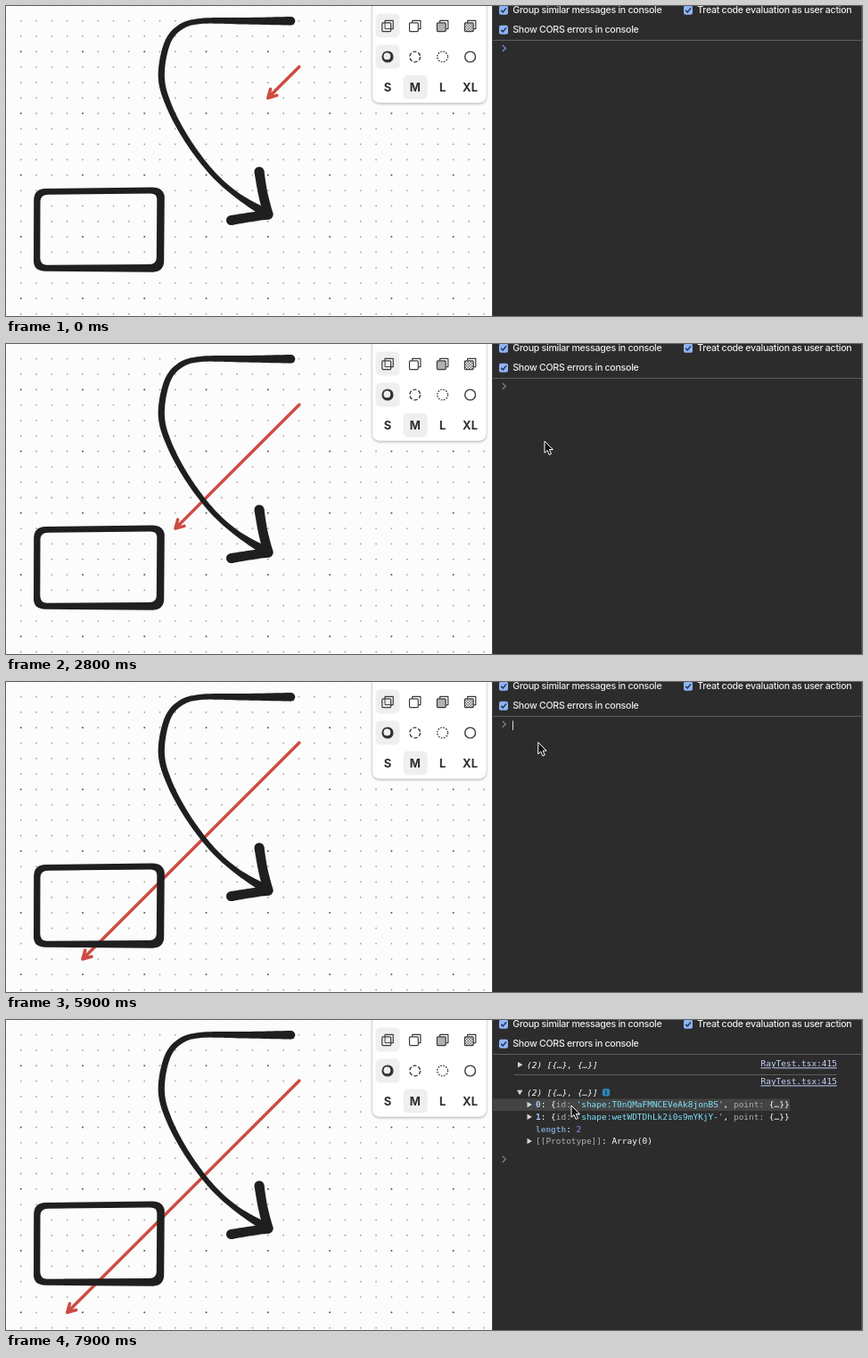
Write an HTML page that moves like this. It is 960 by 348 pixels and loops after 8 s.

```html
<!DOCTYPE html>
<html lang="en">
<head>
<meta charset="utf-8">
<title>Ray test</title>
<style>
html, body { margin: 0; width: 100%; height: 100%; overflow: hidden; background: #2c2c2c; }
svg { display: block; }
.ui { font: 500 10.65px Inter, "Open Sans", sans-serif; letter-spacing: -.028em; fill: #ececec; }
.size { font: 700 13px Inter, sans-serif; fill: #2e2e2e; text-anchor: middle; }
.log { font: 9.46px "DejaVu Sans Mono", "Liberation Mono", monospace; fill: #fff; }
.log .it { font-style: italic; }
.log .link { fill: #c6d4ff; text-decoration: underline; }
.log .key { font-weight: 700; fill: #a9cdf8; }
.log .dim { font-weight: 700; fill: #7595bd; }
.log .sub { fill: #adadad; }
.log .str { fill: #7fe2fd; }
.log .num { fill: #a08cff; }
.tri { fill: #d6d6d6; }
.line { stroke: #5e5e5e; }
.icon { fill: none; stroke: #3a3a3a; stroke-width: 1.2; stroke-linejoin: round; }
</style>
</head>
<body>
<svg width="960" height="348" viewBox="0 0 960 348">
  <defs>
    <filter id="shadow" x="-10%" y="-10%" width="120%" height="125%">
      <feDropShadow dx="0" dy="1" stdDeviation="1.6" flood-opacity=".38"/>
    </filter>
    <pattern id="hatch" width="3" height="3" patternUnits="userSpaceOnUse">
      <path d="M0 0h1.5v1.5h-1.5zM1.5 1.5h1.5v1.5h-1.5z" fill="#666"/>
    </pattern>
    <clipPath id="board"><rect width="545" height="348"/></clipPath>
  </defs>

  <g clip-path="url(#board)">
    <rect width="545" height="348" fill="#fcfcfc"/>
    <g id="dots"></g>
    <path id="ray" fill="none" stroke="#cd4b42" stroke-width="3.5" stroke-linecap="round" stroke-linejoin="round"/>
    <g id="ink" fill="#1f1f1f">
      <path fill-rule="evenodd" d="M44 205L164 203.4Q176.5 203.5 177.8 214L177.2 287Q176.5 298 165 298.7L44 297.8Q31.3 297 31 287L31.2 217Q32 205.4 44 205Z
        M47 211.7L162 210.4Q169.4 210.4 169.3 217L168.8 283Q168.3 289.8 161 290L46 290.7Q38.6 290.7 38.3 283L38.5 219Q38.8 212 47 211.7Z"/>
    </g>
    <g>
      <rect x="411" y="-20" width="127.5" height="128.5" rx="8" fill="#fff" filter="url(#shadow)"/>
      <g fill="#efefef">
        <rect x="414.5" y="8.5" width="27" height="27" rx="5"/>
        <rect x="414.5" y="43.5" width="27" height="27" rx="5"/>
        <rect x="445.5" y="77.5" width="27" height="27" rx="5"/>
      </g>
      <g id="fills" class="icon"></g>
      <g id="dashes" class="icon"></g>
      <g id="sizes" class="size"></g>
    </g>
  </g>

  <rect x="545" width="415" height="348" fill="#2c2c2c"/>
  <path d="M545.5 0V348M959.5 0V348" stroke="#4a4a4a"/>
  <path class="line" d="M546 38.5H960"/>
  <g id="checks"></g>

  <g id="logs" class="log">
    <path class="line" d="M570 61.5H932"/>
    <path class="tri" d="M574 47.1L579.4 50.3L574 53.5Z"/>
    <text class="it" x="584" y="53.8">(2) [{…}, {…}]</text>
    <text class="link" x="846.5" y="52.4">RayTest.tsx:415</text>
    <text class="link" x="846.5" y="72.4">RayTest.tsx:415</text>
    <g id="entry">
      <path id="tri" class="tri" d="M574 77.8L579.4 81L574 84.2Z"/>
      <text class="it" x="584" y="84.6">(2) [{…}, {…}]</text>
    </g>
    <g id="tree">
      <rect id="hover" x="546" y="88.5" width="333" height="13.5" fill="#444"/>
      <rect x="668.8" y="77" width="8.4" height="8.4" rx="2.5" fill="#2e86b8"/>
      <path d="M673 78.5v1.2M673 80.6v3.2" stroke="#12283a" stroke-width="1.2"/>
      <path class="tri" d="M584.5 91.8L589.9 95L584.5 98.2ZM584.5 105.5L589.9 108.7L584.5 111.9ZM584.5 132.8L589.9 136L584.5 139.2Z"/>
      <text x="594" y="98.4"><tspan class="key">0</tspan>: {<tspan class="sub">id: </tspan><tspan class="str">'shape:T0nQMaFMNCEVeAk8jonBS'</tspan>, <tspan class="sub">point: </tspan>{…}}</text>
      <text x="594" y="112.1"><tspan class="key">1</tspan>: {<tspan class="sub">id: </tspan><tspan class="str">'shape:wetWDTDhLk2i0s9mYKjY-'</tspan>, <tspan class="sub">point: </tspan>{…}}</text>
      <text x="594" y="125.8"><tspan class="dim">length</tspan>: <tspan class="num">2</tspan></text>
      <text x="594" y="139.4"><tspan class="sub">[[Prototype]]</tspan>: Array(0)</text>
    </g>
  </g>

  <path id="prompt" fill="none" stroke-width="1.2" d="M556.8 -3.4L560.4 0L556.8 3.4"/>
  <rect id="caret" x="568" y="43.5" width="1" height="10.5" fill="#d8d8d8"/>
  <path id="mouse" d="M0 0V13.2L3 10.4L5.2 15.4L7.5 14.4L5.4 9.5H9.4Z" fill="#111" stroke="#fff" stroke-linejoin="round"/>
</svg>

<script>
const LOOP = 8000, CELL = 17.32;
const $ = id => document.getElementById(id);

function add(parent, tag, attrs, text) {
  const el = document.createElementNS("http://www.w3.org/2000/svg", tag);
  for (const k in attrs) el.setAttribute(k, attrs[k]);
  if (text) el.textContent = text;
  return parent.appendChild(el);
}

// Dot grid, every fourth dot darker
for (let i = -1; i < 32; i++) {
  for (let j = -1; j < 20; j++) {
    const major = i % 4 === 0 && j % 4 === 2;
    add($("dots"), "circle", {
      cx: 16.7 + i * CELL, cy: 16.6 + j * CELL,
      r: major ? 1 : .9, fill: major ? "#585858" : "#a2a2a2"
    });
  }
}

// Smooth stroke of changing width through [x, y, radius] points
function brush(pts) {
  const at = i => pts[Math.max(0, Math.min(pts.length - 1, i))];
  const spline = (a, b, c, d, u) =>
    b + .5 * u * (c - a + u * (2 * a - 5 * b + 4 * c - d + u * (3 * (b - c) + d - a)));
  const mid = [];
  for (let i = 0; i < pts.length - 1; i++) {
    for (let s = 0; s < 12; s++) {
      mid.push([0, 1, 2].map(k => spline(at(i - 1)[k], at(i)[k], at(i + 1)[k], at(i + 2)[k], s / 12)));
    }
  }
  mid.push(at(pts.length));
  const left = [], right = [];
  mid.forEach(([x, y, r], i) => {
    const p = mid[Math.max(0, i - 1)], q = mid[Math.min(mid.length - 1, i + 1)];
    const a = Math.atan2(q[1] - p[1], q[0] - p[0]);
    const dx = -Math.sin(a) * r, dy = Math.cos(a) * r;
    left.push([x + dx, y + dy]);
    right.unshift([x - dx, y - dy]);
  });
  add($("ink"), "path", { d: "M" + left.concat(right).join("L") + "Z" });
  for (const [cx, cy, r] of [mid[0], mid[mid.length - 1]]) add($("ink"), "circle", { cx, cy, r });
}

brush([[319.5, 16.8, 4.8], [270, 16.8, 3.8], [218, 17, 3.1], [194, 24.8, 3.2], [180, 44, 3.4],
  [174.3, 80, 3.6], [183, 112.5, 3.3], [203.6, 151, 3.1], [231, 187.2, 3], [259.5, 212.7, 3.2], [292, 233, 5]]);
brush([[284, 186, 5.5], [288, 210, 5.3], [294, 234, 5.5]]);
brush([[294, 234, 5.5], [274, 237, 5.3], [252.5, 240.5, 5.5]]);

// Style panel
const cols = [428, 458.7, 489.6, 520.6];
cols.forEach((x, i) => {
  const g = $("fills"), dashes = $("dashes");
  add(g, "path", { d: `M${x - 3} 18.6V16.4H${x + 6.2}V25.6H${x + 4}` });
  if (!i) add(g, "path", { d: `M${x - 3} 18.6V25.6H${x + 4}`, "stroke-width": 1 });
  add(g, "rect", { x: x - 6.2, y: 18.8, width: 9.8, height: 9.8, rx: 1,
    fill: ["none", "none", "#b0b0b0", "url(#hatch)"][i] });

  if (!i) {
    add(dashes, "circle", { cx: x, cy: 57, r: 6, fill: "#2a2a2a" });
    add(dashes, "circle", { cx: x - .6, cy: 56.4, r: 3.9, fill: "#efefef", stroke: "none" });
  } else {
    add(dashes, "circle", { cx: x, cy: 57, r: 5.9, "stroke-width": 1.4,
      "stroke-dasharray": ["", "4.1 2.08", "1.6 1.49", "none"][i] });
  }
  add($("sizes"), "text", { x, y: 95.6 }, ["S", "M", "L", "XL"][i]);
});

// Console settings
[[553, 0, "Group similar messages in console"], [760, 0, "Treat code evaluation as user action"],
  [553, 22, "Show CORS errors in console"]].forEach(([x, y, label]) => {
  const g = $("checks");
  add(g, "rect", { x, y: y - .3, width: 10, height: 10, rx: 2, fill: "#8fb4f6" });
  add(g, "path", { d: `M${x + 2.2} ${y + 4.9}l2.1 2.1l3.7 -4.6`, fill: "none", stroke: "#20304c", "stroke-width": 1.5 });
  add(g, "text", { class: "ui", x: x + 15.3, y: y + 8.3 }, label);
});

const raySteps = [300, 800, 1300, 1800, 2300, 2800, 3300, 3800, 4300, 4800, 5400, 5900, 6400];
const blinks = [[2050, 2600], [3350, 3800], [4400, 4800], [5500, 6000], [6700, 7000]];
const mousePath = [[100, 756, 4], [1000, 756, 4], [1600, 624.5, 108], [1800, 604, 109], [3800, 604, 109],
  [4100, 573, 108], [4800, 573, 108], [5150, 595, 70], [5400, 595, 70], [5700, 598, 68],
  [6200, 594.5, 67], [7100, 594.5, 67], [7200, 593, 63], [7400, 593, 63], [7860, 634, 96], [8000, 634, 96]];
const FOCUSED = 2000, LOGGED = 7000, OPENED = 7250;

function mouseAt(t) {
  const n = mousePath.findIndex(p => p[0] > t);
  const [t0, x0, y0] = mousePath[Math.max(0, n - 1)], [t1, x1, y1] = mousePath[n];
  const u = Math.max(0, (t - t0) / (t1 - t0 || 1)), e = u * u * (3 - 2 * u);
  return [x0 + (x1 - x0) * e, y0 + (y1 - y0) * e];
}

const show = (id, on) => { $(id).style.display = on ? "" : "none"; };

function draw(t) {
  const n = raySteps.filter(s => t >= s).length;
  const x = 293.8 - n * CELL, y = 103.2 + n * CELL;
  $("ray").setAttribute("d", `M328.8 68.2L${x} ${y}M${x + 2.8} ${y - 10}L${x} ${y}L${x + 10} ${y - 2.8}`);

  const logged = t >= LOGGED, open = t >= OPENED;
  const [mx, my] = mouseAt(t);
  show("logs", logged);
  show("tree", open);
  show("hover", my >= 88);
  $("entry").setAttribute("transform", `translate(0 ${open ? 0 : -12})`);
  const turn = 90 * Math.max(0, Math.min(1, (t - 7320) / 160));
  $("tri").setAttribute("transform", `rotate(${turn} 576.2 81)`);

  const py = open ? 156.3 : logged ? 89 : 47.4;
  $("prompt").setAttribute("transform", `translate(0 ${py})`);
  $("prompt").setAttribute("stroke", t >= FOCUSED ? "#858585" : "#7097e6");
  show("caret", blinks.some(([a, b]) => t >= a && t < b));
  show("mouse", t >= 100);
  $("mouse").setAttribute("transform", `translate(${mx} ${my})`);
}

function tick() {
  draw(performance.now() % LOOP);
  requestAnimationFrame(tick);
}
tick();
</script>
</body>
</html>
```
